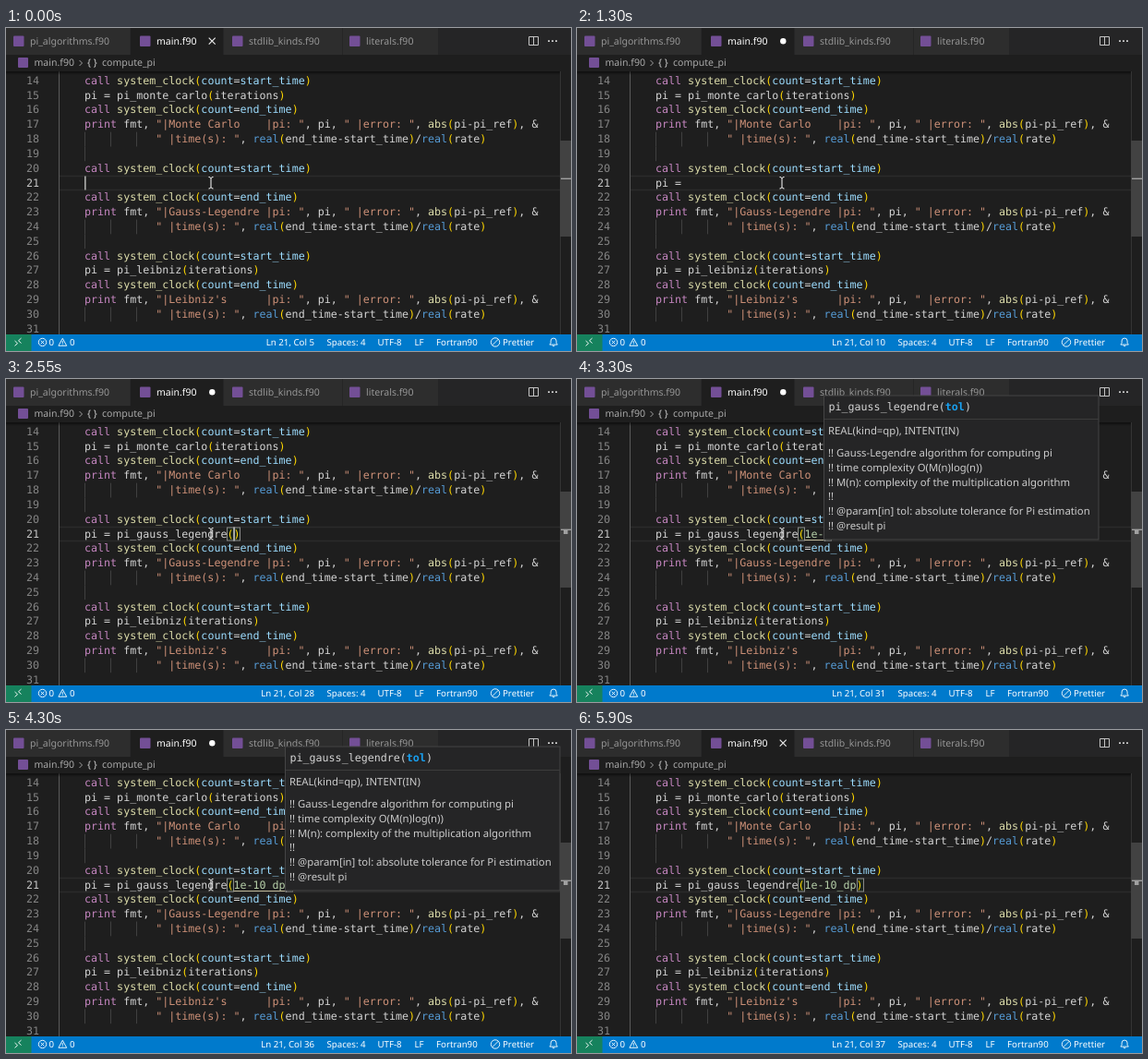
An HTML page that plays this animation: 612 by 350 pixels, repeating every 6 s.

```html
<!DOCTYPE html>
<html lang="en">
<head>
<meta charset="utf-8">
<title>Editor</title>
<style>
  html, body { margin: 0; width: 100%; height: 100%; overflow: hidden; background: #1e1e1e; }
  svg { display: block; width: 612px; height: 350px; }
  text { white-space: pre; text-rendering: geometricPrecision; }
  .code { font: 11.66px "DejaVu Sans Mono", monospace; fill: #d4d4d4; }
  .ui { font: 10.52px "Noto Sans", sans-serif; fill: #969696; }
  .doc { font: 11.33px "Noto Sans", sans-serif; fill: #ccc; }
  .bar { font: 9.7px "Noto Sans", sans-serif; fill: #fff; }
  .num { fill: #858585; text-anchor: end; }
  .str { fill: #ce9178; }
  .key { fill: #c586c0; }
  .type { fill: #569cd6; }
  .fn { fill: #dcdcaa; }
  .lit { fill: #b5cea8; }
  .par { fill: #ffd700; }
  .call .id { fill: #9cdcfe; }
  .icon { fill: none; stroke: #c5c5c5; }
  .white { stroke: #fff; stroke-width: .9; }
  .file { fill: #734f96; }
  .match { fill: rgba(0, 100, 0, .1); stroke: #888; }
  .end { text-anchor: end; }

  /* pointer hides shortly before the loop restarts */
  #pointer { animation: pointer 6s step-end infinite; }
  @keyframes pointer { 95.833% { visibility: hidden; } }
</style>
</head>
<body>
<svg viewBox="0 0 612 350">
  <defs>
    <linearGradient id="shade" x2="0" y2="1">
      <stop stop-color="#000" stop-opacity=".55"/>
      <stop offset="1" stop-color="#000" stop-opacity="0"/>
    </linearGradient>
  </defs>
  <rect width="612" height="350" fill="#1e1e1e"/>

  <g id="editor">
    <path d="M57 160.5H600M57 175.5H600" stroke="#2b2b2b" stroke-width="1.4"/>
    <g id="guides"></g>
    <g id="lines"></g>
    <rect class="match" id="open" y="161" width="7" height="14"/>
    <rect class="match" id="close" y="161" width="7" height="14"/>
    <text class="code" id="typed" x="85" y="171.5"></text>
    <path id="slot" stroke="#bfb899"/>
    <rect id="caret" y="160.5" width="1.6" height="15" fill="#aeafad"/>
    <rect y="47" width="600" height="4" fill="url(#shade)"/>
    <path d="M600.5 47V332" stroke="#343434"/>
    <rect x="600.5" y="122" width="11.5" height="104" fill="#797979" fill-opacity=".4"/>
    <rect x="601" y="162.6" width="11" height="1.4" fill="#a0a0a0"/>
    <rect id="mark" x="604" y="164" width="4.5" height="4" fill="#a0a0a0"/>
  </g>

  <g id="tabs">
    <rect width="612" height="29" fill="#252526"/>
    <path d="M0 0H134.5V29H0zM236 0H364V29H236zM365 0H468V29H365z" fill="#2d2d2d"/>
    <rect x="135" width="100" height="29" fill="#1e1e1e"/>
    <path id="cross" class="icon" d="M219.7 10.7l7 7m0-7l-7 7" style="stroke:#e8e8e8;stroke-width:1.2"/>
    <circle id="dot" cx="223.3" cy="14.2" r="3.2" fill="#fff"/>
    <path class="icon" d="M566.5 9.5h10v9h-10zM571.5 9.5v9"/>
    <path d="M587 14.2h2m2 0h2m2 0h2" stroke="#c5c5c5" stroke-width="1.8"/>
  </g>

  <g id="crumbs">
    <path class="icon" d="M79.5 35l3 3-3 3" style="stroke:#a0a0a0"/>
    <text class="ui" x="88" y="41" style="fill:#ccc">{ }</text>
  </g>

  <g id="status">
    <rect y="332" width="612" height="18" fill="#007acc"/>
    <rect y="332" width="27.5" height="18" fill="#16825d"/>
    <path class="icon white" d="M9.5 339l3 2.7-3 2.7M16.5 336.1l-3 2.7 3 2.7"/>
    <circle class="icon white" cx="39.5" cy="340.5" r="4.2"/>
    <path class="icon white" d="M37.8 338.8l3.4 3.4m0-3.4l-3.4 3.4M61.3 336.3l4.4 8h-8.8zM61.3 339.1v2.6m0 .8v.8"/>
    <circle class="icon white" cx="530" cy="340.5" r="4.7"/>
    <path class="icon white" d="M526.7 343.8l6.6-6.6M588.9 343.1h8.4l-1.2-1.8v-2.2a3 3 0 0 0-6 0v2.2zM592 343.7a1.1 1.1 0 0 0 2.2 0"/>
    <text class="bar end" id="pos" x="334" y="343.9"></text>
  </g>

  <g id="hint">
    <rect x=".5" y="18" width="297.5" height="156" fill="#252526" stroke="#454545"/>
    <path d="M1 43.5H298" stroke="#3c3c3c"/>
    <text class="code" x="5.5" y="34">pi_gauss_legendre(<tspan fill="#18a0f0" font-weight="bold">tol</tspan>)</text>
  </g>

  <path id="pointer" d="M219.5 161.5q2 0 2.5 1.3q.5-1.3 2.5-1.3M222 162.5v10.5M219.5 174q2 0 2.5-1.3q.5 1.3 2.5 1.3" fill="none" stroke="#fff"/>
</svg>

<script>
const LOOP = 6000, LEFT = 85, CHAR = 7.02, ROW = 15.81, FIRST = 14, ACTIVE = 21;
const $ = id => document.getElementById(id);
const add = (id, markup) => $(id).insertAdjacentHTML("beforeend", markup);
const colX = col => LEFT + col * CHAR;
const rowY = n => 168 + (n - ACTIVE) * ROW;
const show = (id, on) => { $(id).style.display = on ? "" : "none"; };
const label = (id, cls, x, y, s, fill = "") =>
  add(id, `<text class="${cls}" x="${x}" y="${y}"${fill && ` style="fill:${fill}"`}>${s}</text>`);

const TOKEN = /(?<str>"[^"]*")|(?<key>\b(?:call|print)\b)|(?<type>\breal\b)|(?<fn>\b(?:system_clock|abs)\b)|(?<lit>\b\d\w*(?:-\w*)?)|(?<par>[()])|(?<id>[a-z_]\w*)|(?<amp>&)/g;
function tint(code) {
  return code.replace(TOKEN, (token, ...rest) => {
    const groups = rest.at(-1);
    const kind = Object.keys(groups).find(k => groups[k] !== undefined);
    return `<tspan class="${kind}">${kind === "amp" ? "&amp;" : token}</tspan>`;
  });
}

// Each timed block spans five rows plus a blank one.
const block = (call, title) => [
  "call system_clock(count=start_time)",
  call,
  "call system_clock(count=end_time)",
  `print fmt, "|${title.padEnd(14)} |pi: ", pi, " |error: ", abs(pi-pi_ref), &`,
  " ".repeat(11) + `" |time(s): ", real(end_time-start_time)/real(rate)`,
  ""
];
const source = [
  ...block("pi = pi_monte_carlo(iterations)", "Monte Carlo"),
  ...block("", "Gauss-Legendre"),
  ...block("pi = pi_leibniz(iterations)", "Leibniz's")
];

source.forEach((code, i) => {
  const n = FIRST + i, y = rowY(n), base = y + 3.5;
  const betweenBlocks = !code && n !== ACTIVE && i < source.length - 1;
  label("lines", "code num", 36, base, n, n === ACTIVE ? "#c6c6c6" : "");
  label("lines", code.startsWith("call") ? "code call" : "code", LEFT, base, tint(code));
  const guides = code.startsWith(" ") ? [0, 4, 8] : betweenBlocks ? [0] : [];
  for (const col of guides)
    add("guides", `<path d="M${Math.round(colX(col)) + .5} ${y - ROW / 2}v${ROW}" stroke="#404040"/>`);
});
add("guides", '<path d="M57.5 47V332" stroke="#5a5a5a"/>');

[[8, "pi_algorithms.f90"], [145, "main.f90", "#fff"], [245, "stdlib_kinds.f90"], [372, "literals.f90"]]
  .forEach(([x, name, fill]) => {
    add("tabs", `<rect class="file" x="${x}" y="8.5" width="11.5" height="11.5" rx="1"/>`);
    label("tabs", "ui", x + 18, 18, name, fill);
  });
add("crumbs", '<rect class="file" x="13" y="32" width="11" height="11" rx="1"/>');
label("crumbs", "ui", 30.5, 41, "main.f90", "#a9a9a9");
label("crumbs", "ui", 104, 41, "compute_pi", "#a9a9a9");

[[46.5, "0"], [69, "0"], [347.5, "Spaces: 4"], [402.5, "UTF-8"], [442.5, "LF"], [466, "Fortran90"], [538, "Prettier"]]
  .forEach(([x, s]) => label("status", "bar", x, 343.9, s));

[[60.3, "REAL(kind=qp), INTENT(IN)"],
 [84, "!! Gauss-Legendre algorithm for computing pi"],
 [99.8, "!! time complexity O(M(n)log(n))"],
 [115.6, "!! M(n): complexity of the multiplication algorithm"],
 [131.4, "!!"],
 [147.2, "!! @param[in] tol: absolute tolerance for Pi estimation"],
 [163, "!! @result pi"]].forEach(([y, s]) => label("hint", "doc", 5, y, s));

// Typing: time and text, the bar marking the caret.
const head = "pi = pi_gauss_legendre(";
const OPEN = head.length - 1;
const keys = [
  [0, "|"], [200, "p|"], [250, "pi|"], [400, "pi |"], [650, "pi =|"], [900, "pi = |"],
  [1350, "pi = p|"], [1400, "pi = pi|"], [1450, "pi = pi_|"], [1550, "pi = pi_g|"],
  [1850, head.slice(0, -1) + "|"],
  ...[[2500, 0], [2850, 1], [3000, 2], [3250, 3], [3500, 4], [3600, 5], [3850, 6], [3950, 7], [4250, 8]]
    .map(([t, n]) => [t, head + "1e-10_dp".slice(0, n) + "|)"]),
  [4700, head + "1e-10_dp)|"]
];
const caretOff = [[1300, 1350], [2200, 2500], [5100, 5400], [5750, LOOP]];
const within = (t, [from, to]) => t >= from && t < to;

let last = "";
function draw(t) {
  const marked = keys.findLast(([at]) => at <= t)[1];
  const col = marked.indexOf("|"), code = marked.replace("|", "");
  const paired = code.endsWith(")"), hint = within(t, [2650, 4700]);

  if (marked !== last) {
    last = marked;
    $("typed").innerHTML = tint(code);
    $("pos").textContent = `Ln 21, Col ${col + 5}`;
    $("caret").setAttribute("x", colX(col));
    $("open").setAttribute("x", Math.round(colX(OPEN)) + .5);
    $("close").setAttribute("x", Math.round(colX(code.length - 1)) + .5);
    $("slot").setAttribute("d", `M${colX(OPEN + 1)} 174.5H${colX(col)}`);
    $("hint").setAttribute("transform", `translate(${Math.floor(colX(col))} 0)`);
  }
  show("caret", !caretOff.some(span => within(t, span)));
  for (const id of ["open", "close", "mark"]) show(id, paired);
  show("slot", hint);
  show("hint", hint);
  const dirty = within(t, [200, 5100]);
  show("dot", dirty);
  show("cross", !dirty);
}

// One clock for the script and the pointer keyframes.
const start = performance.now();
$("pointer").getAnimations().forEach(a => { a.startTime = start; });
function tick() {
  draw((performance.now() - start) % LOOP);
  requestAnimationFrame(tick);
}
tick();
</script>
</body>
</html>
```
